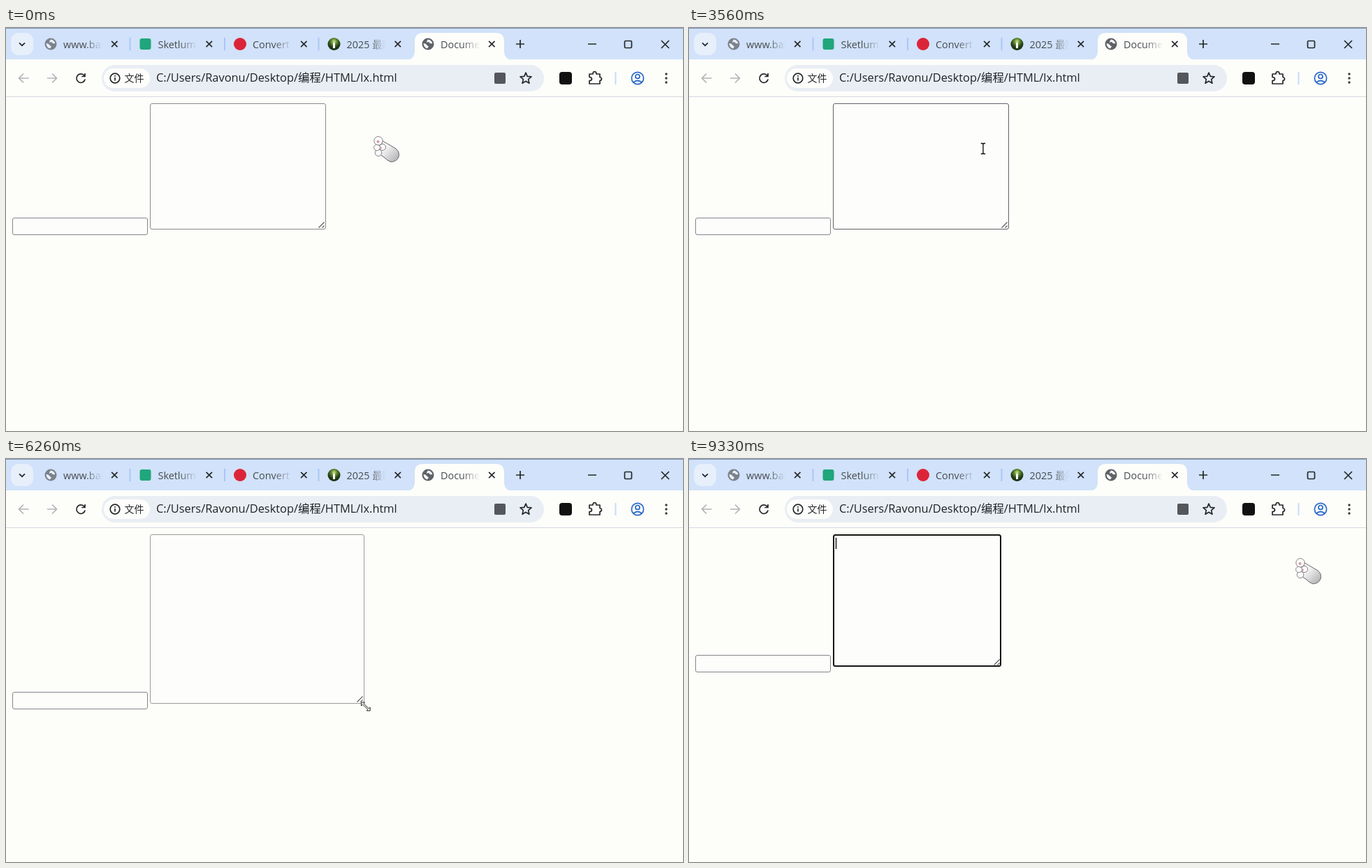
Recreate the animation shown at these times as an HTML page. Size 969 by 578 pixels, loop 9360 ms.

```html
<!DOCTYPE html>
<html lang="zh">
<head>
<meta charset="utf-8">
<title>Document</title>
<style>
html, body { margin: 0; width: 100%; height: 100%; overflow: hidden; background: #fdfdfa; }
svg { display: block; }
text { font-family: 'Open Sans', 'Noto Sans CJK SC', 'Noto Sans CJK', sans-serif; }
.line { fill: none; stroke: #26282b; stroke-width: 1.7; }
.tab { font-size: 14.4px; fill: #474b50; }
</style>
</head>
<body>
<svg width="969" height="578" viewBox="0 0 969 578">
  <defs>
    <linearGradient id="fade">
      <stop offset=".55" stop-color="#fff"/><stop offset="1" stop-color="#fff" stop-opacity="0"/>
    </linearGradient>
    <mask id="titleMask" maskUnits="userSpaceOnUse" x="0" y="0" width="56" height="46">
      <rect width="56" height="46" fill="url(#fade)"/>
    </mask>
    <linearGradient id="fur" x1="0" y1="0" x2="1" y2="1">
      <stop offset=".3" stop-color="#fafafa"/><stop offset="1" stop-color="#a9a9ac"/>
    </linearGradient>
    <radialGradient id="grass" cy=".3">
      <stop offset="0" stop-color="#d5e59a"/><stop offset=".45" stop-color="#5d8a2c"/><stop offset="1" stop-color="#1f3516"/>
    </radialGradient>
    <g id="globe">
      <circle r="8.5" fill="#5f6368"/>
      <path d="M-6.5-1Q-3-1-2 1T1 3Q0 5-1 6.6Q-6 5-6.5-1ZM0-6.5Q5-6 6.4-1Q3 0 2-2T-2-2Q-2-5 0-6.5Z" fill="#f4f6f8"/>
    </g>
    <path id="cross" d="M-4.2-4.2L4.2 4.2M4.2-4.2L-4.2 4.2"/>
  </defs>

  <rect width="969" height="578" fill="#fdfdfa"/>
  <rect width="969" height="46" fill="#d1e2fa"/>
  <rect width="969" height="1" fill="#7f98bb"/>
  <rect x="7" y="7" width="32" height="32" rx="11" fill="#e7effb"/>
  <path d="M19 21.3L23 25.2L27 21.3" class="line"/>
  <path d="M573 46Q585 45 585 33V19Q585 7 597 7H701Q713 7 713 19V33Q713 45 725 46Z" fill="#fdfdfa"/>
  <rect y="45" width="969" height="53" fill="#fdfdfa"/>
  <rect y="98" width="969" height="1" fill="#d5d9e2"/>
  <g id="tabs"></g>
  <path d="M177.5 14V32M313 14V32M447.5 14V32" stroke="#a8c7fa" stroke-width="2"/>
  <path d="M730 23H742M736 17V29M833 23H845M938 18L949 29M949 18L938 29" class="line"/>
  <rect x="885.5" y="18.5" width="10" height="10" rx="1.5" class="line"/>

  <path d="M32.5 72H19M25 65.5L18.5 72L25 78.5M59 72H72.5M66 65.5L72.5 72L66 78.5" class="line" style="stroke:#b2b4b7"/>
  <path d="M112.2 68.5A6.2 6.2 0 1 0 113.2 73.5M113 65V69.5H108.3" class="line"/>
  <rect x="137" y="53" width="633" height="38" rx="19" fill="#e8eef4"/>
  <rect x="140" y="58" width="66" height="28" rx="14" fill="#fdfdfb"/>
  <circle cx="156" cy="72" r="6.8" class="line"/>
  <path d="M156 71V75.6M156 68V69.7" class="line"/>
  <text x="169.5" y="77" font-size="14" fill="#26282b">文件</text>
  <text x="215" y="77.3" font-size="16.4" fill="#202225">C:/Users/Ravonu/Desktop/编程/HTML/lx.html</text>
  <rect x="699" y="64" width="16" height="16" rx="2" fill="#54575b"/>
  <path id="star" class="line" stroke-linejoin="round"/>
  <rect x="792" y="63" width="18" height="18" rx="4" fill="#111"/>
  <path d="M835 66H840Q840 62.5 842.5 62.5T845 66H850V70.5Q852.5 71 852.5 73T850 75.5V80H835V75.5Q838.5 75.5 838.5 73T835 70.5Z" class="line" stroke-linejoin="round"/>
  <path d="M872.5 63V81" stroke="#c9dbf8" stroke-width="2"/>
  <g class="line" style="stroke:#2868c8">
    <circle cx="904" cy="72" r="8.6"/><circle cx="904" cy="69.5" r="3"/><path d="M898 78Q904 73 910 78"/>
  </g>
  <g fill="#36383b"><circle cx="945" cy="66" r="1.7"/><circle cx="945" cy="72" r="1.7"/><circle cx="945" cy="78" r="1.7"/></g>

  <rect id="field" x="9.5" width="193" height="24" rx="2.5" fill="#fdfdfb" stroke="#85858a"/>
  <rect id="area" rx="2.5" fill="#fdfdfb"/>
  <path id="grip" d="M-10-2L-2-10M-5-2L-2-5" class="line" style="stroke:#55575a;stroke-width:1.1"/>
  <path id="caret" d="M210.5 113V129" stroke="#000" stroke-width="1.3"/>

  <g id="paw" stroke="#66666a" stroke-width="1">
    <path d="M13 7L32 18Q38 23 36 30Q33 37 25 37Q19 35 16 31L7 25Z" fill="url(#fur)"/>
    <g fill="#fdfdfd" stroke-width=".8">
      <circle cx="13" cy="16" r="4.6"/><circle cx="7" cy="24" r="4.8"/><circle cx="5" cy="16.5" r="4.4"/>
      <circle cx="7" cy="6.8" r="6.2"/>
    </g>
    <g fill="#d99a9e" stroke="none"><circle cx="6.5" cy="8" r="2"/><circle cx="10.5" cy="17" r="1.4"/></g>
  </g>
  <path id="beam" d="M-3.2-7.5H-1L0-6.5L1-7.5H3.2M0-6.5V6.5M-3.2 7.5H-1L0 6.5L1 7.5H3.2" fill="none" stroke="#111" stroke-width="1.35"/>
  <path id="resize" d="M-6.5-6H-1.5L-3-4.2L4.2 2.8L6.2 1.2V6H1.2L2.9 4.2L-4.4-2.8L-6.5-1Z" fill="#fff" stroke="#222" stroke-width="1"/>
</svg>
<script>
const LOOP = 9360, FOCUS_AT = 8000;
const $ = id => document.getElementById(id);

const tabs = [
  [64, 'www.bai', '<use href="#globe" opacity=".75"/>'],
  [199.5, 'Sketlum', '<rect x="-8" y="-8" width="16" height="16" rx="3" fill="#20a67b"/>'],
  [335, 'Convert', '<circle r="9" fill="#dc2438"/>'],
  [469.5, '2025 最新', '<circle r="9" fill="url(#grass)"/><path d="M-1.5 6V-1Q0-4 1.5-1V6Z" fill="#fff"/>'],
  [604, 'Docume', '<use href="#globe"/>']
];
$('tabs').innerHTML = tabs.map(([x, title, icon]) => `
  <g transform="translate(${x} 23)">${icon}<use href="#cross" x="91.3" class="line"/></g>
  <g transform="translate(${x + 18} 0)" mask="url(#titleMask)"><text class="tab" y="28.5">${title}</text></g>`).join('');

$('star').setAttribute('d', 'M' + Array.from({ length: 10 }, (_, i) => {
  const r = i % 2 ? 3.8 : 8.4, a = i * Math.PI / 5;
  return `${744 + r * Math.sin(a)} ${72.5 - r * Math.cos(a)}`;
}).join('L') + 'Z');

// Rows: time, x, y
const pointer = [
  [150, 526, 155], [850, 408, 178], [2900, 408, 178], [3560, 421, 173], [3820, 442, 272],
  [4150, 459, 293], [4500, 453, 285], [4900, 453, 285], [5720, 511, 324], [5810, 511, 324],
  [6250, 515, 355], [6870, 501, 332], [7500, 442, 293], [7620, 442, 293],
  [7950, 345, 210], [8620, 345, 210], [9150, 868, 142]
];
const corner = [
  [4920, 457.5, 288.5], [5760, 496.5, 316.5], [5810, 496.5, 316.5],
  [6270, 512.5, 350.5], [6870, 498.5, 336.5], [7520, 446.5, 297.5]
];

function at(steps, t) {
  const i = steps.findIndex(s => s[0] > t);
  if (i === 0) return steps[0].slice(1);
  if (i < 0) return steps[steps.length - 1].slice(1);
  const [t0, x0, y0] = steps[i - 1], [t1, x1, y1] = steps[i];
  const p = (t - t0) / (t1 - t0), k = p * p * (3 - 2 * p);
  return [x0 + (x1 - x0) * k, y0 + (y1 - y0) * k];
}

function set(id, attrs) {
  for (const name in attrs) $(id).setAttribute(name, attrs[name]);
}

function draw(t) {
  const [x, y] = at(pointer, t).map(Math.round);
  const [right, bottom] = at(corner, t).map(v => Math.round(v - 0.5) + 0.5);
  const dragging = t >= 4900 && t < 7560;
  const inside = x > 207 && x < right && y > 108 && y < bottom;
  const onGrip = inside && x > right - 15 && y > bottom - 15;
  const focused = t >= FOCUS_AT;
  const inset = focused ? 0.5 : 0;

  set('area', {
    x: 206.5 + inset, y: 108.5 + inset,
    width: right - 206.5 - 2 * inset, height: bottom - 108.5 - 2 * inset,
    stroke: focused ? '#151515' : dragging ? '#9b9b9b' : inside ? '#62626a' : '#8a8a8a',
    'stroke-width': focused ? 2 : 1
  });
  set('field', { y: bottom - 16 });
  set('grip', { transform: `translate(${right} ${bottom})` });
  set('caret', { opacity: focused && (t - FOCUS_AT) % 1000 < 500 ? 1 : 0 });

  const shape = dragging || onGrip ? 'resize' : inside ? 'beam' : 'paw';
  for (const id of ['paw', 'beam', 'resize']) {
    set(id, { transform: `translate(${x} ${y})`, visibility: id === shape ? 'visible' : 'hidden' });
  }
}

const start = performance.now();
function tick() {
  draw((performance.now() - start) % LOOP);
  requestAnimationFrame(tick);
}
tick();
</script>
</body>
</html>
```
